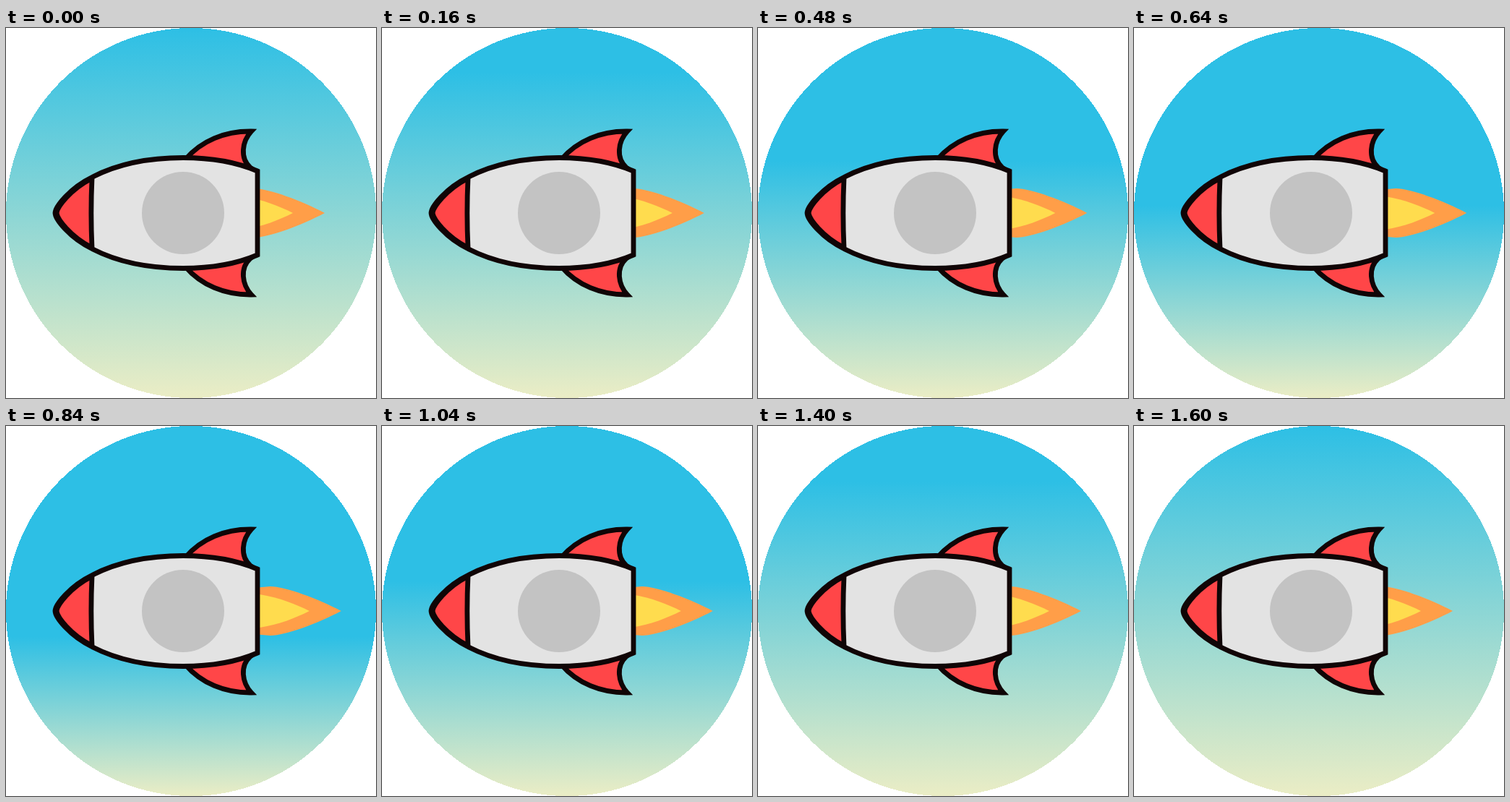
An HTML page with a canvas that plays this animation: 512 by 512 pixels, repeating every 1.7 s.

```html
<!DOCTYPE html>
<html lang="en">
<head>
<meta charset="utf-8">
<title>Rocket</title>
<style>
  html, body { margin: 0; width: 100%; height: 100%; overflow: hidden; background: #fff; }
  canvas { display: block; width: 512px; height: 512px; }
</style>
</head>
<body>
<canvas id="stage" width="512" height="512"></canvas>
<script>
const ctx = document.getElementById("stage").getContext("2d");
const LOOP = 1700, STEP = 40, HALF = 800, END = 1600;
const SIZE = 512, MID = SIZE / 2;
const INK = "#100506", RED = "#ff4648";

const fin = new Path2D(
  "M248 182 C270 156 303 142.5 339.5 143 C326.5 157 323.5 180 338 193 L344 197 V215 L300 210 Z");
const body = new Path2D(
  "M68 256 C68 248 87 222 120 206 C155 188 200 179.5 245 179.5 C285 179.5 320 186 348 198" +
  "V314 C320 326 285 332.5 245 332.5 C200 332.5 155 324 120 306 C87 290 68 264 68 256 Z");
const nose = new Path2D(
  "M70 256 C71 248 88 224 119 208 C117.5 240 117.5 272 119 304 C88 288 71 264 70 256 Z");
const flame = new Path2D(
  "M441 256 C409 239 363 222 343 222 L320 224 V288 L343 290 C363 290 409 273 441 256 Z");
const core = new Path2D(
  "M397 256 C377 246 357 238 328 233 L310 232 V280 L328 279 C357 274 377 266 397 256 Z");

function fill(path, color) {
  ctx.fillStyle = color;
  ctx.fill(path);
}

function outlined(path, color) {
  fill(path, color);
  ctx.strokeStyle = INK;
  ctx.lineWidth = 6.8;
  ctx.stroke(path);
}

// Whole-pixel rows keep the rim of the sky hard-edged.
function drawSky(rise) {
  const sky = ctx.createLinearGradient(0, 307 * rise, 0, SIZE);
  sky.addColorStop(0, "#2dbfe5");
  sky.addColorStop(1, "#ebedc5");
  ctx.fillStyle = sky;
  for (let y = 0; y < SIZE; y++) {
    const half = Math.round(Math.sqrt(MID ** 2 - (y + 0.5 - MID) ** 2));
    ctx.fillRect(MID - half, y, 2 * half, 1);
  }
}

function drawFlame(rise) {
  ctx.save();
  ctx.translate(24 * rise, 0);
  fill(flame, "#ff9e48");
  fill(core, "#ffdc4e");
  ctx.restore();
}

function drawRocket() {
  outlined(fin, RED);
  ctx.save();
  ctx.translate(0, SIZE);
  ctx.scale(1, -1);
  outlined(fin, RED);
  ctx.restore();
  outlined(body, "#e3e3e3");
  outlined(nose, RED);
  ctx.beginPath();
  ctx.arc(245, MID, 57, 0, Math.PI * 2);
  ctx.fillStyle = "#c3c3c3";
  ctx.fill();
}

function draw(now) {
  const time = Math.min(END, Math.floor((now % LOOP) / STEP) * STEP);
  const rise = 1 - Math.abs(time - HALF) / HALF;
  ctx.clearRect(0, 0, SIZE, SIZE);
  drawSky(rise);
  drawFlame(rise);
  drawRocket();
}

let start;
function tick(now) {
  start ??= now;
  draw(now - start);
  requestAnimationFrame(tick);
}
draw(0);
requestAnimationFrame(tick);
</script>
</body>
</html>
```
